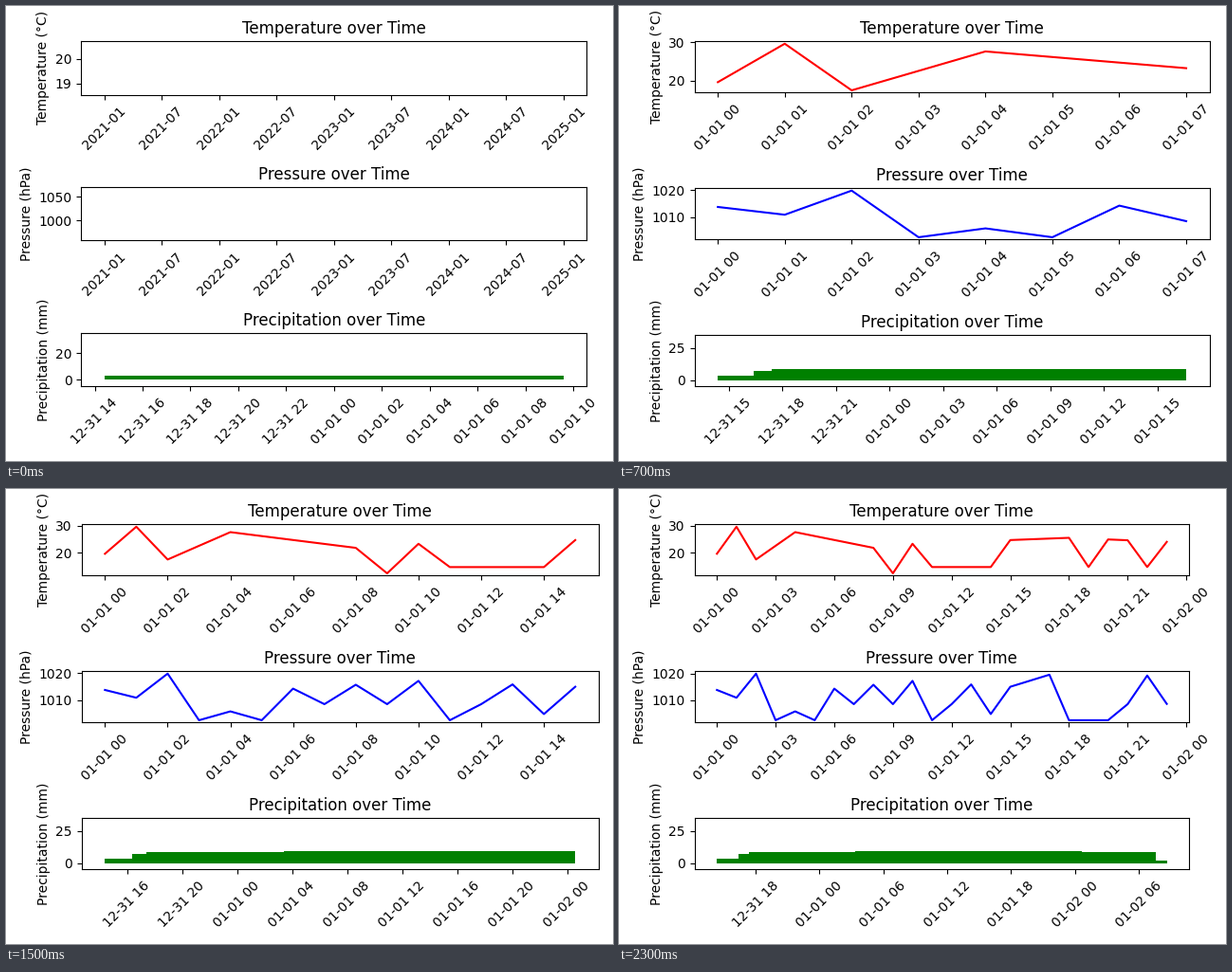
These frames come from a looping animation (640 by 480 pixels, 2400 ms). A matplotlib script:

```python
import matplotlib.pyplot as plt
from matplotlib.animation import FuncAnimation
import numpy as np

HOURS = 24
hours = np.arange(HOURS)
times = np.datetime64("2023-01-01T00:00") + hours * np.timedelta64(1, "h")


def trend(points, dips):
    """Straight runs between key points, dropping to a level at some hours."""
    values = np.interp(hours, *zip(*points))
    for level, when in dips.items():
        values[when] = level
    return values


temp = trend([(0, 19.62), (1, 29.6), (2, 17.5), (4, 27.6), (8, 21.8), (9, 12.4),
              (10, 23.3), (18, 25.5), (23, 24)],
             {14.7: [11, 12, 13, 14, 19, 22]})
pressure = 1000 + trend([(0, 13.8), (1, 10.9), (2, 19.9), (4, 5.8), (6, 14.3),
                         (10, 17.2), (15, 15), (17, 19.5), (22, 19.2), (23, 8.6)],
                        {2.5: [3, 5, 11, 18, 19, 20], 4.8: [14],
                         8.5: [7, 9, 12, 21]})
rain = np.repeat([3.2, 7, 8.5, 5.6, 9.2, 7, 5.6, 8.5, 2],
                 [2, 1, 5, 5, 3, 1, 5, 1, 1])

fig = plt.figure(figsize=(6.4, 4.8), dpi=100)


def label(ax, name, unit):
    ax.set_title(f"{name} over Time")
    ax.set_ylabel(f"{name} ({unit})")
    ax.tick_params(axis="x", rotation=45)


def update(i):
    fig.clear()
    fig.subplots_adjust(left=0.125, right=0.9, bottom=0.11, top=0.88,
                        hspace=0.2, wspace=0.2)
    top, mid, low = fig.subplots(3, 1)
    t = times[:i + 1]
    top.plot(t, temp[:i + 1], "r-")
    mid.plot(t, pressure[:i + 1], "b-")
    low.bar(t, rain[:i + 1], color="g")
    low.set_ylim(-5, 35)
    label(top, "Temperature", "°C")
    label(mid, "Pressure", "hPa")
    label(low, "Precipitation", "mm")
    # label overhang depends on the axes width, so settle in two passes
    for _ in range(2):
        fig.tight_layout()
    return []


anim = FuncAnimation(fig, update, frames=HOURS, interval=100, repeat=True,
                     repeat_delay=0, init_func=lambda: [])
plt.show()
```
